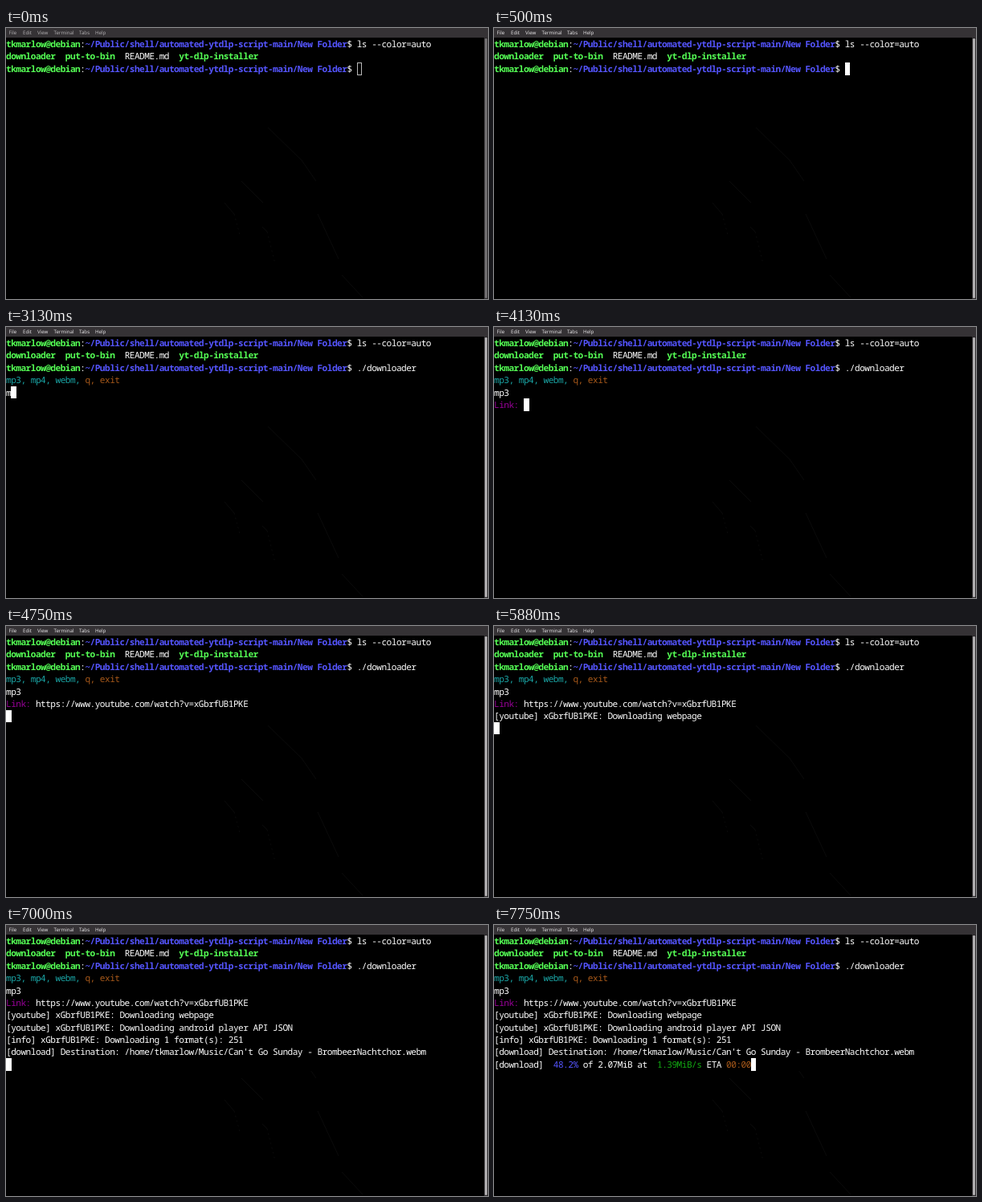
Recreate the animation shown at these times as an HTML page. Size 600 by 338 pixels, loop 8 s.

```html
<!DOCTYPE html>
<html lang="en">
<head>
<meta charset="utf-8">
<title>Terminal session</title>
<style>
  html, body { margin: 0; width: 100%; height: 100%; overflow: hidden; background: #000; }
  #stage { position: relative; width: 600px; height: 338px; overflow: hidden; background: #000; }
  #stage > * { position: absolute; }
  #wall { left: 0; top: 0; }
  #wall path { fill: none; stroke: #0b0b0b; stroke-width: 1; }
  #menu { left: 0; top: 0; width: 600px; height: 12px; background: #353235; color: #b4b2b4;
    font: 6.2px/12px "Open Sans", "Noto Sans", sans-serif; text-rendering: geometricPrecision; }
  #menu span { position: absolute; top: 0; }
  .focus #menu { color: #eceaec; }
  #bar { left: 595px; top: 12px; width: 5px; height: 326px; background: #2c2a2c; }
  #bar::after { content: ""; position: absolute; left: 1.3px; top: 1px; width: 2.4px; height: 324px;
    border-radius: 1.2px; background: #716f71; }
  .focus #bar::after { background: #b0aeb0; }
  #term { --cell: 6.15px; left: 0; top: 13.1px; margin: 0; color: #fff; white-space: pre;
    font: 11.13px/15.36px "Noto Sans Mono", monospace; font-stretch: condensed;
    letter-spacing: calc(var(--cell) - 1ch); text-rendering: geometricPrecision;
    font-variant-ligatures: none; }
  #term i { display: inline-block; position: relative; top: -.5px; box-sizing: border-box;
    width: 6.6px; height: 15.36px; vertical-align: top; border: 1px solid #b8b8b8; }
  .focus #term i { background: #fff; border-color: #fff; }
  .user, .exe { color: #5f5; font-weight: bold; }
  .dir { color: #55f; font-weight: bold; }
  .cyan { color: #1aa6a6; }
  .brown { color: #a8591a; }
  .purple { color: #980098; }
  .blue { color: #55f; }
  .green { color: #12a812; }
</style>
</head>
<body>
<div id="stage">
  <svg id="wall" width="600" height="338">
    <path d="M326 124L368 165L386 191M293 191L320 218M272 218L284 232M319 248L325 254M388 232L414 288M418 308L444 336"/>
    <path stroke-dasharray="2 4" d="M284 232L291 258M325 254L335 294"/>
    <rect id="wipe" y="119"/>
  </svg>
  <div id="menu"></div>
  <div id="bar"></div>
  <pre id="term"></pre>
</div>
<script>
const LOOP = 8000;
const $ = id => document.getElementById(id);
const ink = (cls, text) => `<span class="${cls}">${text}</span>`;

const prompt = ink('user', 'tkmarlow@debian') + ':' +
  ink('dir', '~/Public/shell/automated-ytdlp-script-main/New Folder') + '$ ';
const video = 'xGbrfUB1PKE';

const progress = (pct, speed, eta) =>
  `\r[download] ${ink('blue', (pct + '%').padStart(6))} of 2.07MiB at ` +
  `${ink('green', speed.padStart(10))} ETA ${ink('brown', eta)}`;

// Terminal output: [time in ms, text appended]
const output = [
  [0, prompt + 'ls --color=auto\n' +
    `${ink('exe', 'downloader')}  ${ink('exe', 'put-to-bin')}  README.md  ${ink('exe', 'yt-dlp-installer')}\n` +
    prompt],
  [1000, '.'], [1130, '/'], [1250, 'd'],
  [1500, 'o'], [1630, 'w'], [1750, 'nloader '],
  [2380, '\n'],
  [2500, ink('cyan', 'mp3, mp4, webm, ') + ink('brown', 'q, exit') + '\n'],
  [3130, 'm'], [3380, 'p'], [3500, '3'], [3630, '\n'],
  [3750, ink('purple', 'Link:') + ' '],
  [4630, 'https://www.youtube.com/watch?v=' + video],
  [4750, '\n'],
  [5880, `[youtube] ${video}: Downloading webpage\n`],
  [6500, `[youtube] ${video}: Downloading android player API JSON\n`],
  [6880, `[info] ${video}: Downloading 1 format(s): 251\n`],
  [7000, "[download] Destination: /home/tkmarlow/Music/Can't Go Sunday - BrombeerNachtchor.webm\n"],
  [7130, progress('0.0', '21.50KiB/s', '01:38')],
  [7250, progress('3.0', '310.2KiB/s', '00:06')],
  [7380, progress('12.0', '718.4KiB/s', '00:02')],
  [7630, progress('24.1', '1.02MiB/s', '00:01')],
  [7750, progress('48.2', '1.39MiB/s', '00:00')],
];

const menu = { File: 3.5, Edit: 21, View: 39, Terminal: 59.5, Tabs: 91, Help: 111 };
$('menu').innerHTML = Object.entries(menu)
  .map(([name, x]) => `<span style="left:${x}px">${name}</span>`).join('');

let shown = '';
function draw(t) {
  $('stage').className = t >= 380 ? 'focus' : '';

  // New output rows repaint the faint wallpaper behind them
  $('wipe').setAttribute('width', t >= 7000 ? 523 : t >= 6500 ? 357 : 0);
  $('wipe').setAttribute('height', t >= 7000 ? 63 : 32);

  const text = output.filter(([at]) => at <= t).map(([, s]) => s).join('')
    .replace(/[^\n]*\r/g, '');
  if (text === shown) return;
  shown = text;
  $('term').innerHTML = text + '<i></i>';
}

const start = performance.now();
function tick() {
  draw((performance.now() - start) % LOOP);
  requestAnimationFrame(tick);
}
tick();
</script>
</body>
</html>
```
